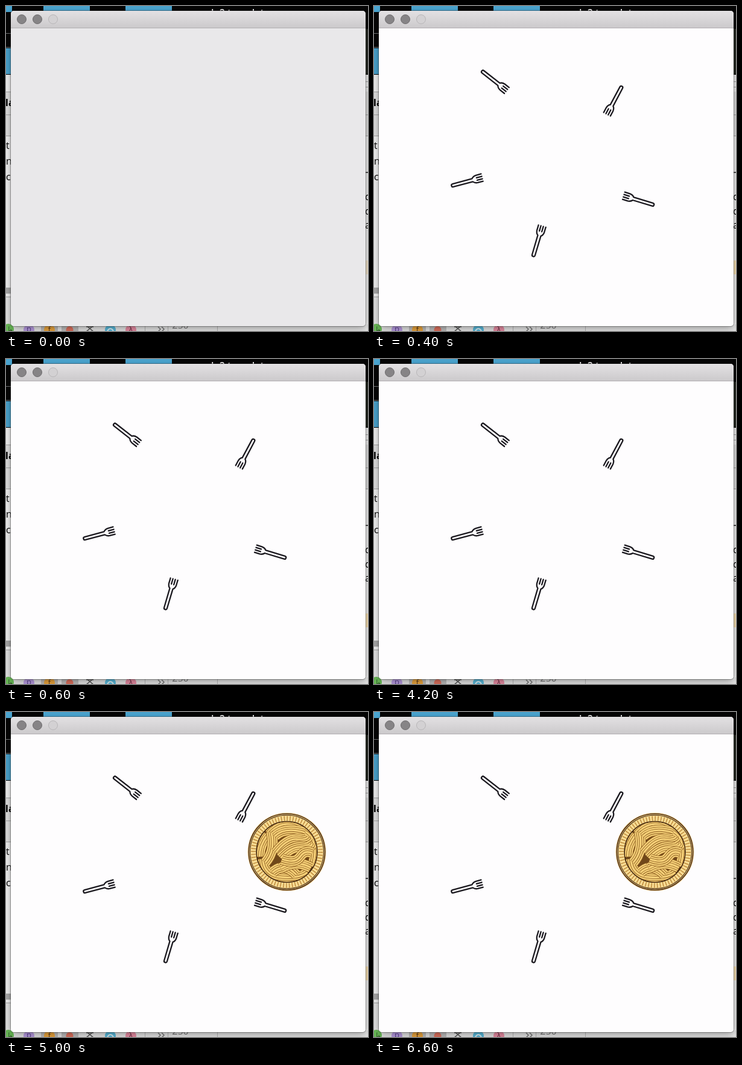
These frames come from a looping animation (600 px wide and 539 px high, 8 s). An HTML page:

```html
<!DOCTYPE html>
<html lang="en">
<head>
<meta charset="utf-8">
<title>Forks and plate</title>
<style>
  html, body { margin: 0; width: 100%; height: 100%; overflow: hidden; }
  svg { display: block; width: 100%; height: 100%; }
  text { font-family: "Open Sans", sans-serif; font-size: 16px; }
  .fork { fill: none; stroke: #1c1a20; stroke-width: 2.3; stroke-linecap: round; stroke-linejoin: round; }
  .icons text { font-size: 13px; text-anchor: middle; }
</style>
</head>
<body>
<svg viewBox="0 0 600 539" preserveAspectRatio="none">
  <defs>
    <linearGradient id="bar" x2="0" y2="1">
      <stop stop-color="#e3e1e3"/><stop offset="1" stop-color="#cbc9cb"/>
    </linearGradient>
    <filter id="blur" x="-10%" y="-10%" width="120%" height="120%"><feGaussianBlur stdDeviation="7"/></filter>
    <clipPath id="dish"><circle r="49.5"/></clipPath>
    <path id="fork" class="fork" d="M26-6.3H17Q12-6 9.5-2.6L-24-2.5A2.5 2.5 0 0 0-24 2.5L9.5 2.6Q12 6 17 6.3H26M26-2.1H17M26 2.1H17"/>
  </defs>

  <!-- Desktop behind the window -->
  <rect width="600" height="539" fill="#f4f4f4"/>
  <rect width="600" height="114" fill="#050505"/>
  <path fill="#4ba5d0" d="M0 0H10V10H0zM62 0H139V10H62zM198 0H275V10H198zM0 70H10V113H0z"/>
  <path stroke="#77797a" d="M0 45.5H10M0 68.5H10"/>
  <path stroke="#282b25" stroke-width="5" d="M598 38V113"/>
  <text x="437" y="17" fill="#fff" font-weight="600" text-anchor="end">node2 template</text>
  <path fill="#e2e2e2" d="M0 142H10V215H0zM594 142H600V215H594z"/>
  <path stroke="#a5a5a5" d="M0 142.5H10M0 180.5H10M0 215.5H10M0 482.5H10M0 517.5H10M594 125.5H600M594 134.5H600M594 180.5H600M594 215.5H600"/>
  <text x="-1" y="166" font-weight="700">la</text>
  <text x="0" y="237">t</text><text x="0" y="263">n</text><text x="0" y="289">c</text>
  <path stroke="#222" stroke-width="1.5" d="M595 276H600"/>
  <text x="595" y="322">d</text><text x="595" y="346">d</text><text x="595" y="369">a</text>
  <rect id="tint" x="594" y="422" width="6" height="23"/>
  <rect y="467" width="10" height="10" fill="#aaa"/>
  <rect y="483" width="10" height="56" fill="#e6e6e6"/>

  <g class="icons">
    <rect y="528" width="600" height="11" fill="#e5e5e5"/>
    <path fill="#bcbcbc" d="M58 528H86V539H58zM92 528H120V539H92z"/>
    <circle cx="4" cy="536" r="9" fill="#69b957"/>
    <circle cx="38" cy="537" r="9" fill="#b79be0"/>
    <circle cx="72" cy="537" r="9" fill="#e9a43d"/>
    <circle cx="105.5" cy="537" r="6" fill="#dc705d"/>
    <circle cx="173" cy="537" r="9" fill="#58b8da"/>
    <circle cx="207" cy="537" r="9" fill="#e78ca3"/>
    <text x="7" y="541" fill="#335c2d">↳</text>
    <text x="38" y="540" fill="#58428a">p</text>
    <text x="72" y="541" fill="#52351b">f</text>
    <text x="207" y="541" fill="#682f43">λ</text>
    <path d="M133 530L145 540M145 530L133 540M133 532H145" stroke="#555" stroke-width="1.5"/>
    <path d="M168 539Q173 531 178 539" fill="none" stroke="#d7eef4" stroke-width="2"/>
    <path d="M252 532L256 536L252 540M258 532L262 536L258 540" fill="none" stroke="#777" stroke-width="1.5"/>
    <path d="M230.5 528V539M268.5 528V539M350.5 528V539" stroke="#b5b5b5"/>
    <text x="289" y="535" fill="#777" style="font-size:16px">250</text>
  </g>

  <!-- Window -->
  <rect x="8" y="13" width="588" height="521" rx="6" opacity=".38" filter="url(#blur)"/>
  <rect x="7.5" y="7.5" width="589" height="524" rx="5.5" fill="none" stroke="#000" opacity=".3"/>
  <rect x="8" y="8" width="588" height="523" rx="5" id="pane"/>
  <path d="M8 37V13A5 5 0 0 1 13 8H591A5 5 0 0 1 596 13V37z" fill="url(#bar)"/>
  <path d="M8 36.5H596" stroke="#b1afb1"/>
  <g fill="#868486" stroke="#706e70">
    <circle cx="26" cy="22" r="7.5"/><circle cx="52" cy="22" r="7.5"/>
    <circle cx="78" cy="22" r="7.5" fill="#d3d1d3" stroke="#b8b6b8"/>
  </g>

  <g id="forks">
    <use href="#fork" transform="translate(199.5 124) rotate(38)"/>
    <use href="#fork" transform="translate(398.5 156.5) rotate(118)"/>
    <use href="#fork" transform="translate(154 291.3) rotate(-15)"/>
    <use href="#fork" transform="translate(438.7 322.3) rotate(197)"/>
    <use href="#fork" transform="translate(271.3 390) rotate(-73.500)"/>
  </g>

  <g id="plate" transform="translate(465.5 232)" fill="none">
    <circle r="65" fill="#f3d294"/>
    <circle r="63.2" fill="#f6d88e" stroke="#4a2c12" stroke-width="1.6"/>
    <circle r="60.8" stroke="#4a2c12" stroke-width="1.4"/>
    <circle r="55.5" stroke="#f8dc94" stroke-width="9.500"/>
    <circle r="55.5" stroke="#b98435" stroke-width="8" pathLength="360" stroke-dasharray="1.400 3.600"/>
    <circle r="50.3" fill="#70481a" stroke="#42260e" stroke-width="1.8"/>
    <g id="noodles" clip-path="url(#dish)"></g>
  </g>
</svg>
<script>
const LOOP = 8000, FORKS_AT = 400, PLATE_AT = 5000;
const byId = id => document.getElementById(id);

// Bundles of pasta, painted from back to front, relative to the plate's centre.
const bundles = [
  "M-30-30Q-8-54 16-42T40-24",
  "M-40 12Q-38 40-8 42T34 34",
  "M40-26Q52-4 42 24",
  "M-45 8Q-46-10-32-28",
  "M-36 18Q-18-2-26-34",
  "M-24 34Q-4 16 16 38",
  "M-20-26Q-4-42 30-32",
  "M-10 27Q14 12 40 26",
  "M-18 1Q0-22 16-21T35-25",
  "M-10 10Q8-10 24-8T42-14",
  "M-8 12Q14 20 22 8T42 2"
];

// Ever narrower strokes along one curve leave parallel strands.
function noodleBundle(d) {
  let strands = "";
  for (let width = 18; width > 1; width -= 6.5) {
    strands += `<path d="${d}" stroke="#8a5a1d" stroke-width="${width}"/>` +
               `<path d="${d}" stroke="#f5d078" stroke-width="${width - 1.7}"/>`;
  }
  return strands;
}
byId("noodles").innerHTML = bundles.map(noodleBundle).join("");

function draw(now) {
  const time = now % LOOP;
  const open = time >= FORKS_AT;
  byId("pane").setAttribute("fill", open ? "#fefdfe" : "#e9e8ea");
  byId("tint").setAttribute("fill", open ? "#fde6b8" : "#f7ead0");
  byId("forks").setAttribute("visibility", open ? "visible" : "hidden");
  byId("plate").setAttribute("visibility", time >= PLATE_AT ? "visible" : "hidden");
}

function tick() {
  draw(performance.now());
  requestAnimationFrame(tick);
}
tick();
</script>
</body>
</html>
```
